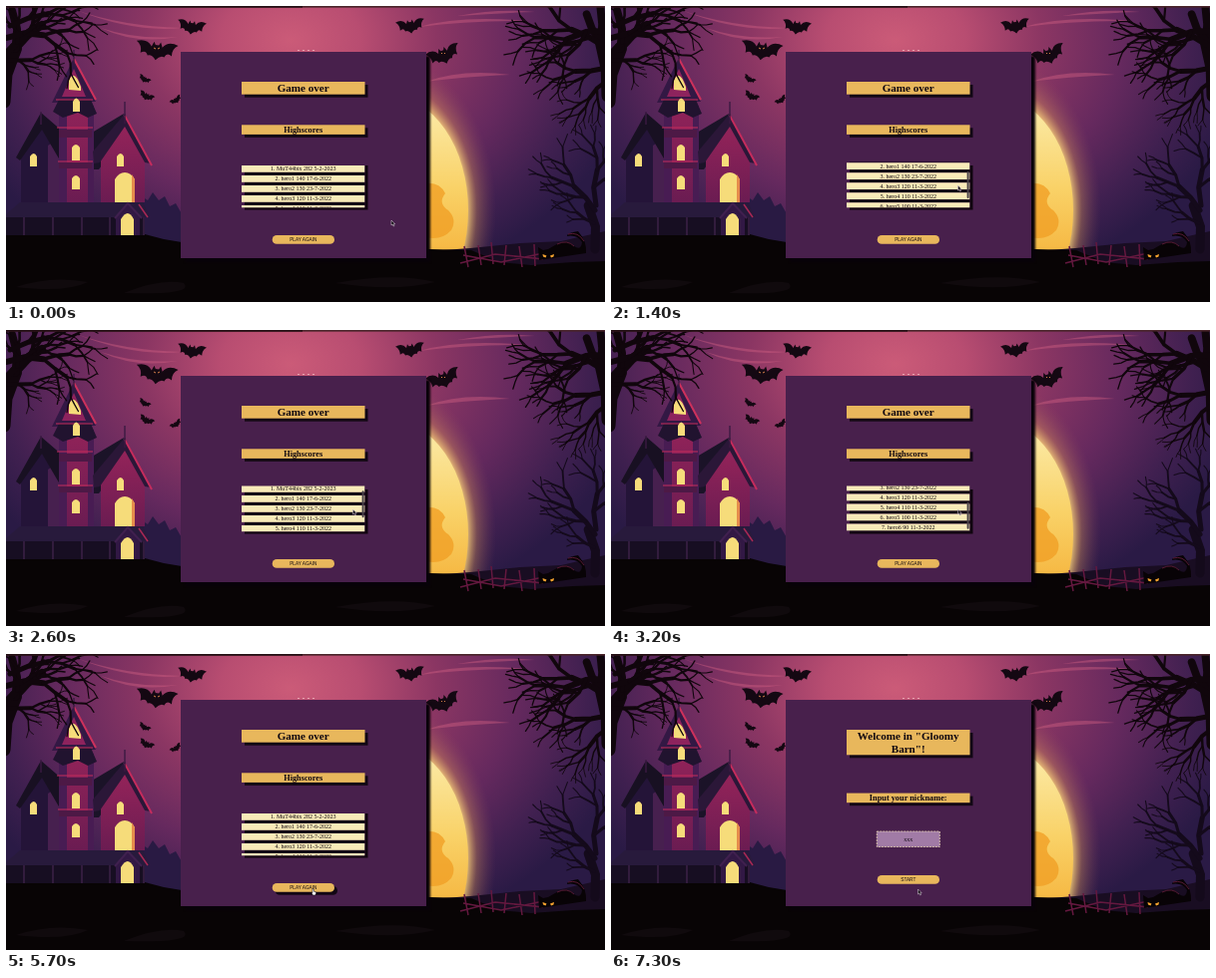
An HTML page that plays this animation: 600x297 px, repeating every 7400 ms.

```html
<!DOCTYPE html>
<html lang="en">
<head>
<meta charset="utf-8">
<title>Halloween highscores</title>
<style>
  html, body { margin: 0; width: 100%; height: 100%; overflow: hidden; background: #080405; }
  svg { display: block; width: 100%; height: 100%; }
  text { text-anchor: middle; fill: #100810; font-family: "Liberation Serif", serif; }
  .title { font-size: 11.1px; font-weight: bold; }
  .subtitle { font-size: 8.3px; font-weight: bold; }
  .row { font-size: 6px; }
  .button { font: 4.7px "Liberation Sans", sans-serif; }
  .gold { fill: #e8b75c; }
  .shadow { filter: drop-shadow(3px 3px .7px #0a030cdd); }
  .lit { fill: #f6dc7a; }
</style>
</head>
<body>
<svg viewBox="0 0 600 297">
  <defs>
    <radialGradient id="sky" gradientUnits="userSpaceOnUse" cx="285" cy="34" r="350" gradientTransform="matrix(1 0 0 .74 0 9)">
      <stop offset="0" stop-color="#cb5b78"/>
      <stop offset=".2" stop-color="#b84d71"/>
      <stop offset=".42" stop-color="#8b3663"/>
      <stop offset=".65" stop-color="#65295e"/>
      <stop offset=".85" stop-color="#402050"/>
      <stop offset="1" stop-color="#2a1a45"/>
    </radialGradient>
    <radialGradient id="halo">
      <stop offset=".74" stop-color="#ffd678" stop-opacity=".75"/>
      <stop offset=".82" stop-color="#d99859" stop-opacity=".35"/>
      <stop offset="1" stop-color="#8e4a5c" stop-opacity="0"/>
    </radialGradient>
    <linearGradient id="moon" x2="0" y2="1">
      <stop offset=".05" stop-color="#fbeaa6"/>
      <stop offset=".4" stop-color="#f9d268"/>
      <stop offset=".75" stop-color="#f5b23a"/>
    </linearGradient>
    <linearGradient id="wall" x2="0" y2="1">
      <stop offset="0" stop-color="#98245a"/>
      <stop offset="1" stop-color="#6b1c52"/>
    </linearGradient>
    <clipPath id="listBox"><rect x="230" y="156.5" width="129.5" height="45.8"/></clipPath>
    <path id="bat" d="M-10-3Q-5-5-2.6-1L-1.6-3.6-.8-2H.8L1.6-3.6 2.6-1Q5-5 10-3 7-1 7.5 3 5 1 4 4 2 3 0 6-2 3-4 4-5 1-7.5 3-7-1-10-3Z"/>
  </defs>

  <rect width="600" height="297" fill="url(#sky)"/>
  <g fill="#cf5d82" opacity=".45">
    <path d="M70 4Q115 20 176 22 128 27 70 4ZM95 22Q130 34 172 31 130 39 95 22Z"/>
    <path d="M414 21Q455 9 522 15 460 15 414 21ZM452 10Q495 2 530 6 492 7 452 10ZM421 76Q456 63 505 69 455 71 421 76Z"/>
  </g>
  <ellipse cx="384" cy="205" rx="107" ry="156" fill="url(#halo)"/>
  <ellipse cx="384" cy="205" rx="79" ry="115" fill="url(#moon)"/>
  <path d="M420 178Q434 176 440 188 432 198 443 205 452 214 446 225 436 236 420 232Z" fill="#f2a026" opacity=".8"/>

  <!-- distant shrubs and ground -->
  <path d="M134 240V190L142 195 147 187 153 195 159 191 164 201 170 198 178 212V240Z" fill="#291a43"/>
  <path d="M424 246L465 243 515 238 556 236 600 226V270H424Z" fill="#190d22"/>
  <path d="M0 229H139L158 234 176 237 424 244 466 245 494 257 526 260 568 257 600 256V297H0Z" fill="#080405"/>
  <path d="M10 282Q45 270 82 277 60 288 10 282ZM118 288Q155 273 178 278 190 290 118 288ZM330 278Q390 267 430 277 390 287 330 278Z" fill="#100a0d"/>

  <!-- house -->
  <g>
    <path d="M15 197V147L35 117 56 145V197Z" fill="#241438"/>
    <path d="M42 140L57 130V197H42Z" fill="#47204f"/>
    <path d="M35 107L57 126V160L36 124 14 155 10 152Z" fill="#181022"/>
    <path d="M76 133L118 108 108 143 93 164H80Z" fill="#1b1328"/>
    <path d="M53 83H85V197H53Z" fill="url(#wall)"/>
    <path d="M53 95H61V197H53ZM82 100H88V197H82Z" fill="#481c53"/>
    <path d="M53 124H86V132H53ZM53 157H86V163H53Z" fill="#4d1946"/>
    <path d="M95 197V147L119 113 139 153V197Z" fill="url(#wall)"/>
    <path d="M87 146L119 108 145 158 139 157 119 121 94 157 88 158Z" fill="#2b1738"/>
    <path d="M119 110L146 160" stroke="#c52c5d" stroke-width="2"/>
    <path d="M68 52L90 96 46 97Z" fill="#331844"/>
    <path d="M68 63L80 91H56Z" fill="#8d235d"/>
    <path d="M68 53L90 94" stroke="#cd315c" stroke-width="2"/>
    <path d="M53 94H85L91 108 82 112 72 107 57 112 47 106Z" fill="#21132f"/>
    <path d="M50 94H87M51 122H87M52 156H87" stroke="#c52c5c" stroke-width="1.2"/>
    <path d="M35 106V119M68 44V58M119 96V118" stroke="#3b1a42" stroke-width="1.4"/>
    <g class="lit">
      <path d="M63 84V75Q68 62 75 81V85ZM67 106V96Q70 89 74 96V106ZM66 155V142Q70 136 74 142V155ZM66 184V173Q70 167 74 173V184ZM24 161V151Q28 145 31 151V161ZM111 161V151Q115 145 118 151V161Z"/>
      <path d="M109 197V174Q113 167 119 167 125 167 129 174V197Z"/>
    </g>
    <path d="M126 169L129 174V197H126Z" fill="#e58b4b"/>
    <path d="M0 210H139V230H0Z" fill="#170e22"/>
    <path d="M14 197H137L144 212H0V209Z" fill="#281a3c"/>
    <path d="M110 212L122 198 134 212V230H110Z" fill="#321844"/>
    <path d="M115 230V214Q122 202 128 214V230Z" class="lit"/>
    <path d="M109 213L122 198 136 213" fill="none" stroke="#40204f" stroke-width="2"/>
    <path d="M133 199L142 212" stroke="#a82855" stroke-width="1.5"/>
    <path d="M18 212V230M47 212V230M76 212V230M104 212V230M138 212V230" stroke="#3a2145" stroke-width="1.6"/>
  </g>

  <g id="trees" fill="none" stroke-linecap="round"></g>

  <g fill="#140812">
    <use href="#bat" transform="translate(151 43) rotate(7) scale(2.1 1.9)"/>
    <use href="#bat" transform="translate(186 20) rotate(8) scale(1.45)"/>
    <use href="#bat" transform="translate(405 19) rotate(-8) scale(1.45)"/>
    <use href="#bat" transform="translate(438 48) rotate(-20) scale(1.75)"/>
    <use href="#bat" transform="translate(139 73) rotate(30) scale(.65)"/>
    <use href="#bat" transform="translate(141 90) rotate(25) scale(.8)"/>
    <use href="#bat" transform="translate(170 94) rotate(-35) scale(.65)"/>
  </g>
  <path d="M148 42l2 1M152 43l2-1M436 47l1 1M439 48l1-1" stroke="#e88b50" stroke-width=".9"/>

  <!-- fence and cat -->
  <path d="M455 258L490 249 538 254M458 250L496 257 538 248M459 241L463 262M473 240L476 260M486 237L488 259M501 240L499 260M514 241L517 262M529 239L530 261" fill="none" stroke="#64183f" stroke-width="1.5"/>
  <path d="M534 255L533 242 538 245 543 244 550 240Q562 233 569 241 576 246 577 237 572 229 562 231 561 228 573 226 582 236 581 248 573 251L570 262H565L563 254 555 256 552 263H546L543 259Z" fill="#080306"/>
  <path d="M552 239Q562 234 569 241M563 229Q573 226 579 236" fill="none" stroke="#69203f" stroke-width=".8"/>
  <path d="M537.5 249l4 1.5-1 2-2.5-1ZM545 250.5l4-1.5-.5 2.5-2.5 1Z" fill="#f5a32f"/>

  <rect width="600" height="1.6" fill="#482329"/>
  <rect width="297" height="1.6" fill="#210d12"/>
  <path d="M292 44.5h17" stroke="#e5a4b0" stroke-width="1" stroke-dasharray="2 3"/>
  <rect x="175" y="46" width="246" height="207" fill="#48204c" style="filter:drop-shadow(4px 4px .8px #080209)"/>

  <g id="gameOver">
    <rect class="gold shadow" x="236" y="76" width="123.5" height="12.7"/>
    <text class="title" x="297.7" y="86">Game over</text>
    <rect class="gold shadow" x="236" y="119.3" width="123.5" height="9.6"/>
    <text class="subtitle" x="297.7" y="126.8">Highscores</text>
    <path d="M359.5 160H362.5V204.5H239V202.3H359.5Z" fill="#10050f"/>
    <g clip-path="url(#listBox)">
      <g id="rows"></g>
      <rect id="thumb" x="356.6" width="2" height="27" rx="1" fill="#4b4349"/>
    </g>
    <rect id="playAgain" class="gold" x="266.7" y="230" width="62.3" height="8.8" rx="4.4"/>
    <text class="button" x="297.8" y="236">PLAY AGAIN</text>
  </g>

  <g id="welcome">
    <rect class="gold shadow" x="236" y="76" width="123.5" height="25.3"/>
    <text class="title" x="297.7" y="86">Welcome in "Gloomy</text>
    <text class="title" x="297.7" y="98.5">Barn"!</text>
    <rect class="gold shadow" x="236" y="139.6" width="123.5" height="9.6"/>
    <text class="subtitle" x="297.7" y="147">Input your nickname:</text>
    <rect x="266.3" y="178" width="63" height="15.5" fill="#a17ba6" stroke="#ead7b5" stroke-width=".8" stroke-dasharray="2 1"/>
    <text class="row" x="297.8" y="187.7">xxx</text>
    <rect class="gold" x="266.7" y="222" width="62.3" height="8.8" rx="4.4"/>
    <text class="button" x="297.8" y="228.2">START</text>
  </g>

  <g id="cursor" stroke-width=".5">
    <path id="arrow" d="M0 0V5L1.2 4 2.1 6 3 5.6 2.2 3.7H3.7Z" fill="#0b070c" stroke="#e8dce8"/>
    <path id="hand" d="M-.5 0Q.3-.7.8 0V2.2L3 2.8V4.5L2.2 6H0L-1.7 3.5-.5 3.6Z" fill="#fff" stroke="#0b070c"/>
  </g>
</svg>
<script>
const LOOP = 7400, STEP = 100, HOVER = 4500, RESTART = 6700;
const el = id => document.getElementById(id);

let seed = 17;
const random = () => (seed = seed * 16807 % 2147483647) / 2147483647;

function grow(x, y, angle, length, width, depth, color) {
  const bend = angle + (random() - .5) * .7;
  const mx = x + Math.cos(angle) * length * .5, my = y + Math.sin(angle) * length * .5;
  const ex = mx + Math.cos(bend) * length * .5, ey = my + Math.sin(bend) * length * .5;
  el('trees').insertAdjacentHTML('beforeend',
    `<path d="M${x} ${y}L${mx} ${my} ${ex} ${ey}" stroke="${color}" stroke-width="${width}"/>`);
  if (!depth) return;
  const fork = (px, py, turn) =>
    grow(px, py, bend + turn, length * (.55 + random() * .25), width * .6, depth - 1, color);
  fork(ex, ey, .2 + random() * .4);
  fork(ex, ey, -.2 - random() * .4);
  if (depth > 1) fork(mx, my, random() < .5 ? .7 : -.7);
}

// x, y, angle, length, width, depth
const nearTrees = [
  [-2, 96, -1.5, 55, 13, 1], [0, 48, -.8, 32, 7, 3], [0, 32, -.25, 38, 6, 3],
  [0, 55, -.05, 25, 4, 3], [4, 20, -.4, 40, 5, 3],
  [603, 90, -1.6, 55, 13, 1], [602, 42, -2.6, 40, 6, 3], [602, 25, 3.1, 42, 6, 3],
  [602, 62, 2.95, 32, 5, 3], [602, 75, 2.5, 25, 4, 3]
];
const farTrees = [
  [590, 244, -1.55, 45, 9, 0], [590, 205, -2.2, 32, 5, 3],
  [591, 200, -1.7, 36, 5, 3], [589, 218, -2.7, 20, 3, 2]
];
farTrees.forEach(limb => grow(...limb, '#140a1b'));
nearTrees.forEach(limb => grow(...limb, '#10060c'));

const scores = [
  'MuT44bix 282 5-2-2023', 'hero1 140 17-6-2022', 'hero2 130 23-7-2022',
  'hero3 120 11-3-2022', 'hero4 110 11-3-2022', 'hero5 100 11-3-2022', 'hero6 90 11-3-2022'
];
el('rows').innerHTML = scores.map((score, i) => `
  <rect class="shadow" x="236" y="${160 + i * 10}" width="123.5" height="6.8" fill="#f8eab8"/>
  <text class="row" x="297.8" y="${165.4 + i * 10}">${i + 1}. ${score}</text>`).join('');

// Keys are [time, value] pairs, eased between neighbours.
function tween(keys, t) {
  const next = keys.findIndex(key => key[0] > t);
  if (next < 0) return keys[keys.length - 1][1];
  const [t0, v0] = keys[next - 1], [t1, v1] = keys[next];
  const u = (t - t0) / (t1 - t0);
  return v0 + (v1 - v0) * u * u * (3 - 2 * u);
}
// The list is scrolled down and back up three times.
const scrollKeys = [
  [0, 0], [600, 0], [1100, 25.5], [1200, 25.5], [1600, 0],
  [1700, 0], [2130, 25.5], [2300, 25.5], [2700, 0],
  [2800, 0], [3200, 25.5], [3400, 25.5], [3800, 0]
];
const xKeys = [[0, 386], [600, 347.5], [3900, 347.5], [4300, 317], [4600, 307.5]];
const yKeys = [[0, 215], [600, 180], [3900, 180], [4300, 227], [4600, 236]];
const thumbKeys = [[0, 0], [500, 0], [700, 1], [4300, 1], [4600, 0]];

const show = (id, visible) => el(id).style.display = visible ? '' : 'none';

function draw(now) {
  const t = Math.floor(now % LOOP / STEP) * STEP;
  const playing = t < RESTART, hover = playing && t >= HOVER;
  const scroll = tween(scrollKeys, t);
  show('gameOver', playing);
  show('welcome', !playing);
  show('hand', hover);
  show('arrow', !hover);
  el('rows').setAttribute('transform', `translate(0 ${-scroll})`);
  el('thumb').setAttribute('y', 159 + scroll * .54);
  el('thumb').setAttribute('opacity', tween(thumbKeys, t));
  el('playAgain').classList.toggle('shadow', hover);
  el('cursor').setAttribute('transform', `translate(${tween(xKeys, t)} ${tween(yKeys, t)})`);
  requestAnimationFrame(draw);
}
draw(0);
</script>
</body>
</html>
```
